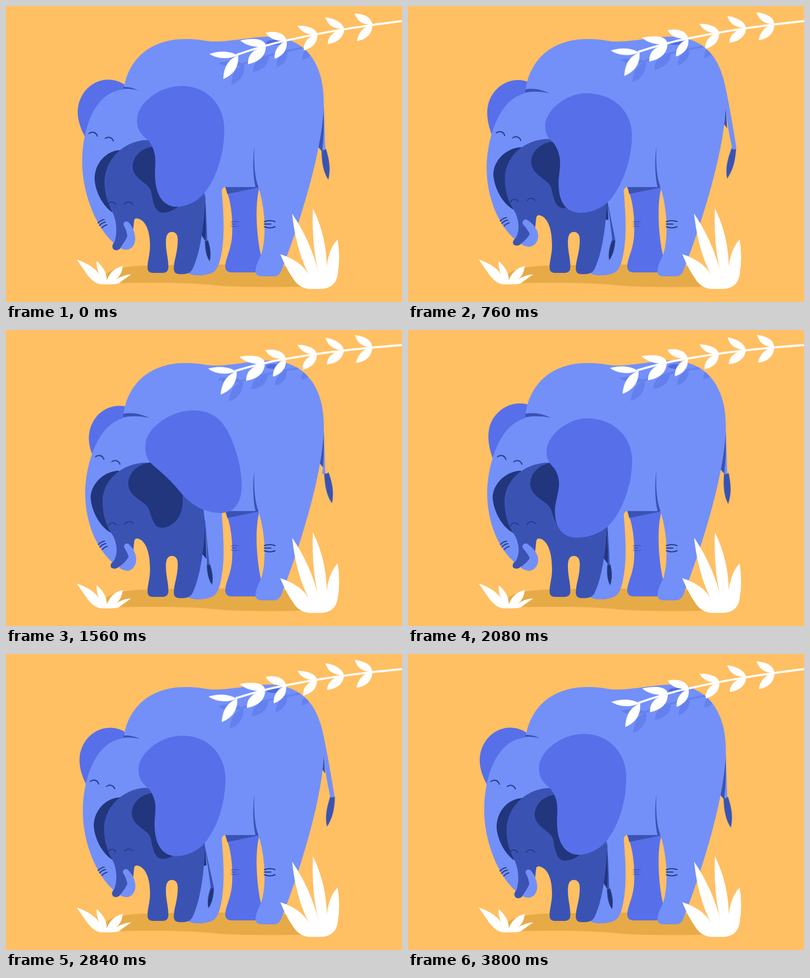
An HTML page without scripts for the animation above (3.84 s loop, 800 by 600 pixels).

```html
<!DOCTYPE html>
<html lang="en">
<head>
<meta charset="utf-8">
<title>Elephants</title>
<style>
:root { --sine: cubic-bezier(.37, 0, .63, 1); }
html, body { margin: 0; width: 100%; height: 100%; overflow: hidden; background: #ffbf63; }
svg { display: block; width: 800px; height: 600px; }

.skin { fill: #7390f9; }
.ear { fill: #5770e9; }
.calf { fill: #3a53b3; }
.navy { fill: #21367d; }
.line { fill: none; stroke: #21367d; stroke-width: 2.2; stroke-linecap: round; }

/* Nuzzle: one slow move out and back per loop */
.nuzzle { animation: 3840ms var(--sine) infinite; }
.far-ear { animation-name: far-ear; }
.head { animation-name: head; }
.fold { animation-name: fold; }
.near-ear { animation-name: near-ear; }
.curl { animation-name: curl; }
.eyes { animation-name: eyes; }
.wrinkles { animation-name: wrinkles; }
.calf-far-ear { animation-name: calf-far-ear; }
.calf-head { animation-name: calf-head; }
.calf-near-ear { animation-name: calf-near-ear; }
.calf-eyes { animation-name: calf-eyes; transform-origin: 231px 400px; }

@keyframes far-ear {
  0%, 82.3%, 100% { d: path("M240 160C215 142 180 147 160 172C138 200 142 232 159 264L240 230Z"); }
  27.5% { d: path("M242 152C215 144 187 157 172 182C158 207 163 235 172 262L240 230Z"); }
  40.6% { d: path("M242 155C217 150 191 160 177 184C163 208 166 232 175 254L240 230Z"); }
  54.7% { d: path("M242 151C215 143 186 156 171 181C157 206 162 235 172 263L240 230Z"); }
}
@keyframes head {
  0%, 82.3%, 100% { d: path("M275 172C250 166 220 166 198 186C165 215 153 275 154 320C155 385 185 455 222 484L234 491L250 440L300 300Z"); }
  27.5%, 54.7% { d: path("M289 178C262 170 232 175 210 193C175 222 159 290 160 335C161 390 182 445 220 475L236 486L250 440L300 300Z"); }
}
@keyframes fold {
  0%, 82.3%, 100% { d: path("M237 164Q252 163 267 171Q250 167 237 168Z"); }
  27.5%, 54.7% { d: path("M237 170Q262 165 289 178Q262 172 237 177Z"); }
}
@keyframes near-ear {
  0%, 82.3%, 100% { d: path("M265 225C270 195 310 162 355 162C410 162 441 205 441 250C441 300 425 350 400 380C385 398 362 407 343 407C315 405 300 380 301 335C302 310 304 295 288 273C270 258 263 248 265 225Z"); }
  27.5%, 28.5% { d: path("M280 242C284 210 325 180 362 180C420 181 455 218 455 266C454 310 440 355 415 390C398 412 372 422 348 422C318 420 303 400 305 355C309 325 313 305 296 279C283 268 279 258 280 242Z"); }
  40.6% { d: path("M282 228C286 200 330 163 378 163C420 163 440 185 455 220C470 255 478 295 476 322C474 355 458 371 432 371C405 370 380 360 356 333C333 304 312 287 296 273C284 262 280 250 282 228Z"); }
  54.2% { d: path("M280 242C284 210 325 179 362 179C418 180 453 218 453 266C452 310 438 355 413 388C396 410 368 421 338 421C308 419 295 395 297 360C302 325 313 310 296 281C283 268 279 258 280 242Z"); }
}
@keyframes curl {
  0%, 82.3%, 100% { d: path("M238 445C235 437 245 434 249 440C256 448 261 460 261 472C261 486 252 494 243 494Q236 494 231 490Q240 478 245 467Q244 455 238 445Z"); }
  20%, 54.2% { d: path("M232 442C229 434 238 430 243 435C255 443 263 455 263 466C263 480 253 488 244 488Q235 487 228 482Q240 473 246 462Q241 452 232 442Z"); }
  28%, 40.6% { d: path("M239 441C237 433 246 430 250 436C258 444 263 455 263 465C263 480 253 488 245 488Q236 487 229 482Q240 472 248 460Q245 450 239 441Z"); }
}
@keyframes eyes { 27.5%, 54.7% { transform: translate(13.3px, -1.5px); } 82.3% { transform: none; } }
@keyframes wrinkles { 27.5%, 54.7% { transform: translate(.7px, -5px); } 82.3% { transform: none; } }
@keyframes calf-eyes { 27.5%, 54.7% { transform: translate(1.2px, -7.5px) rotate(-4deg); } 82.3% { transform: none; } }
@keyframes calf-far-ear {
  0%, 82.3%, 100% { d: path("M234 292C200 292 178 322 179 352C181 378 196 405 214 418L240 330Z"); }
  27.5%, 54.7% { d: path("M228 285C192 287 170 318 171 340C173 370 192 402 214 412L240 330Z"); }
}
@keyframes calf-head {
  0%, 82.3%, 100% { d: path("M285 272C250 271 200 301 199 357C199 385 208 405 216 420C225 440 224 465 219 479C214 484 214 489 217 493C222 497 228 495 232 490Q240 480 246 466L257 452L259 434Q260 430 265 430.5C280 433 291 452 291 485L398 400V360C370 300 330 272 285 272Z"); }
  27.5%, 54.7% { d: path("M288 269C242 267 197 298 195 346C195 380 205 400 215 415C226 435 226 455 217 469C211 473 210 478 213 482C218 485 224 484 228 480Q240 472 248 461L257 448L259 429Q260 422 265 422.5C280 425 291 446 291 485L398 400V360C370 300 330 269 288 269Z"); }
}
@keyframes calf-near-ear {
  0%, 82.3%, 100% { d: path("M297 285C270 289 255 308 256 328C258 350 285 358 292 372C297 390 297 419 318 419C345 417 365 395 366 365C366 340 340 305 297 285Z"); }
  28.5% { d: path("M293 271C266 275 247 292 247 313C248 341 279 347 287 364C293 380 294 407 313 407C340 405 359 380 359 350C360 325 335 292 293 271Z"); }
  40.6%, 54.7% { d: path("M293 268C265 272 247 290 247 312C248 340 280 345 288 362C295 378 297 401 315 401C340 400 358 375 357 345C360 322 335 288 293 268Z"); }
}

/* Tails: two swings per loop, the tufts lag behind */
.swing { animation: 960ms var(--sine) infinite alternate; }
.tail { animation-name: tail; }
.gap { animation-name: gap; }
.tail-end { animation-name: tail-end; }
.calf-tail { animation-name: calf-tail; }
.calf-gap { animation-name: calf-gap; }
.calf-tail-end { animation-name: calf-tail-end; }
.tuft { animation-name: tuft; animation-delay: -220ms; }

@keyframes tail {
  from { d: path("M636 148Q642 180 642.5 215L645 290Q642 294 639 291Q643.5 250 641.5 212Z"); }
  to { d: path("M636 142Q647 185 663.5 288Q659 293 655 289Q646 250 642 208Z"); }
}
@keyframes gap {
  from { d: path("M642 200L643 300L630 285Z"); }
  to { d: path("M642 205L645 242L636 230Z"); }
}
@keyframes tail-end { from { transform: translate(641.5px, 291px); } to { transform: translate(659.5px, 289px); } }
@keyframes calf-tail {
  from { d: path("M402 380Q405 420 406.5 476L402.5 477Q405 430 402 395Z"); }
  to { d: path("M401 385Q406 410 420 473L414 476Q408 430 401 390Z"); }
}
@keyframes calf-gap {
  from { d: path("M402 382L405 480L392 460Z"); }
  to { d: path("M402 390L405 428L396 430Z"); }
}
@keyframes calf-tail-end { from { transform: translate(404.8px, 476px); } to { transform: translate(416.5px, 474px); } }
@keyframes tuft { from { transform: rotate(-12deg); } to { transform: rotate(12deg); } }

.sway { transform-origin: 800px 31px; animation: sway 1920ms var(--sine) infinite alternate; }
@keyframes sway { to { transform: rotate(3deg); } }
</style>
</head>
<body>
<svg viewBox="0 0 800 600">
  <defs>
    <path id="body" d="M237 178C241 118 283 66 365 67C395 67 405 73 428 72C460 71 500 62 530 62C600 62 642 110 642 195C642 290 590 450 557 535Q552 548 541 548H518Q504 548 504 538C505 520 514 512 518 495C526 460 523 410 511 371L509 367H443Q436 367 436 377C439 410 442 460 437 490Q432 530 420 539Q405 547 385 546Q370 545 362 538L360 440L290 400L237 330Z"/>
    <clipPath id="on-body"><use href="#body"/></clipPath>
    <path id="tuft" d="M-4-1Q0 2 5-1C8 20 9 40 0 62C-9 42-7 20-4-1Z"/>
    <path id="stem" fill="none" stroke-width="4.2" d="M466 99Q520 80 566 70Q650 51 740 38.500T830 28"/>
    <path id="low-leaves" d="M468 100C450 90 430 91 411 97C425 107 450 109 468 100
      M469 100C448 108 440 125 439 148C458 140 471 125 469 100
      M525 83C500 86 488 98 489 118C510 113 524 103 525 83
      M567 71C550 76 541 92 543 107C561 100 569 88 567 71
      M629 57C610 61 600 75 602 90C619 85 630 75 629 57"/>
    <path id="high-leaves" d="M525 83C525 70 510 62 473 70C488 82 505 84 525 83
      M567 71C565 58 550 49 525 54C530 65 545 72 567 71
      M629 57C627 46 610 39 589 40C597 54 610 59 629 57
      M683 47C682 35 665 25 645 23C650 38 660 46 683 47
      M683 47C665 49 650 60 650 77C669 75 683 63 683 47
      M740 38C740 25 725 16 704 15C710 31 720 38 740 38
      M740 38C723 41 712 53 709 71C729 68 741 55 740 38"/>
  </defs>

  <rect width="800" height="600" fill="#ffbf63"/>
  <path fill="#e6aa47" d="M190 562C195 535 230 527 290 526C360 524 480 523 540 525Q600 529 612 545L605 569Q500 571 430 567C360 559 290 561 190 562Z"/>

  <!-- Adult -->
  <path class="nuzzle far-ear ear"/>
  <path class="ear" d="M443 367C455 395 458 430 457 460C456 495 443 510 443 528Q443 540 456 540H530L515 505C507 470 502 410 511 371V367Z"/>
  <path class="calf" d="M443 366H511L510 368L447 381Z"/>
  <path class="swing gap calf"/>
  <g class="swing tail-end"><use href="#tuft" class="swing tuft calf"/></g>
  <path class="swing tail skin"/>
  <use href="#body" class="skin"/>
  <path class="calf" d="M501.500 285C498 315 499 345 504 367H510C502 345 501 320 501.500 285Z"/>
  <path class="line" style="stroke:#3a53b3;stroke-width:1.3" d="M455 438Q462 435.500 470 438M456 442H465M455 446Q462 448.500 470 446"/>
  <path class="line" d="M522 437Q533 433 543.500 437M522 442H535M522 447.500Q533 452 543.500 447.500"/>

  <g clip-path="url(#on-body)">
    <g transform="matrix(.885 0 0 .89 66.5 29)">
      <g class="sway" fill="#6480ee">
        <use href="#stem" stroke="#6480ee"/>
        <use href="#low-leaves"/>
      </g>
    </g>
    <ellipse cx="541" cy="74" rx="15" ry="5" fill="#506ae0"/>
  </g>

  <path class="nuzzle head skin"/>
  <path class="nuzzle fold calf"/>
  <path class="nuzzle eyes line" d="M167.500 258.500C173 254 182 255 184.500 264M200.500 268.500C206 264 214 266 217 273.500"/>
  <path class="nuzzle wrinkles line" style="stroke-width:2" d="M186 440Q191 434 198.500 433M189 445Q194 439 201 438M193.500 450Q198 445 204 443.500"/>

  <!-- Calf -->
  <path class="nuzzle calf-far-ear navy"/>
  <path class="swing calf-gap navy"/>
  <g class="swing calf-tail-end"><g transform="scale(.68)"><use href="#tuft" class="swing tuft navy"/></g></g>
  <path class="swing calf-tail calf"/>
  <path class="nuzzle calf-head calf"/>
  <path class="calf" d="M291 484C291 505 286 515 286 530Q286 541 297 541H316Q328 541 328 529C328 510 323 500 323 478Q323 458 335 458Q347 458 347 475C347 500 339 515 339 532Q339 543 350 543.500H356Q370 544 376 535C391 506 400 450 402 395Q401 375 398 360L290 420Z"/>
  <path class="nuzzle calf-eyes line" style="stroke-width:1.8" d="M206 402C210 395.500 218 395.500 221.500 402.500M239 402C243 395.500 252 395.500 256 402"/>
  <path class="nuzzle calf-near-ear navy"/>

  <path class="nuzzle curl skin"/>
  <path class="nuzzle near-ear ear"/>

  <!-- Plants -->
  <g fill="#fff">
    <path d="M143 514C170 523 188 537 193 555Q182 535 183 517Q204 535 203.500 556Q213 532 236 527Q234 545 222 555Q235 545 253 544Q240 553 228 562Q222 565 190 564Q178 562 165 546Z"/>
    <path d="M554 503Q597 517 612 545Q586 495 578 421Q616 477 632 543Q617 485 620 410Q647 465 648 528Q652 492 670 473Q676 510 670 545Q665 573 635 573.500H615Q595 573 583 557Q567 535 554 503Z"/>
    <g class="sway">
      <use href="#stem" stroke="#fff"/>
      <use href="#low-leaves"/>
      <use href="#high-leaves"/>
    </g>
  </g>
</svg>
</body>
</html>
```
